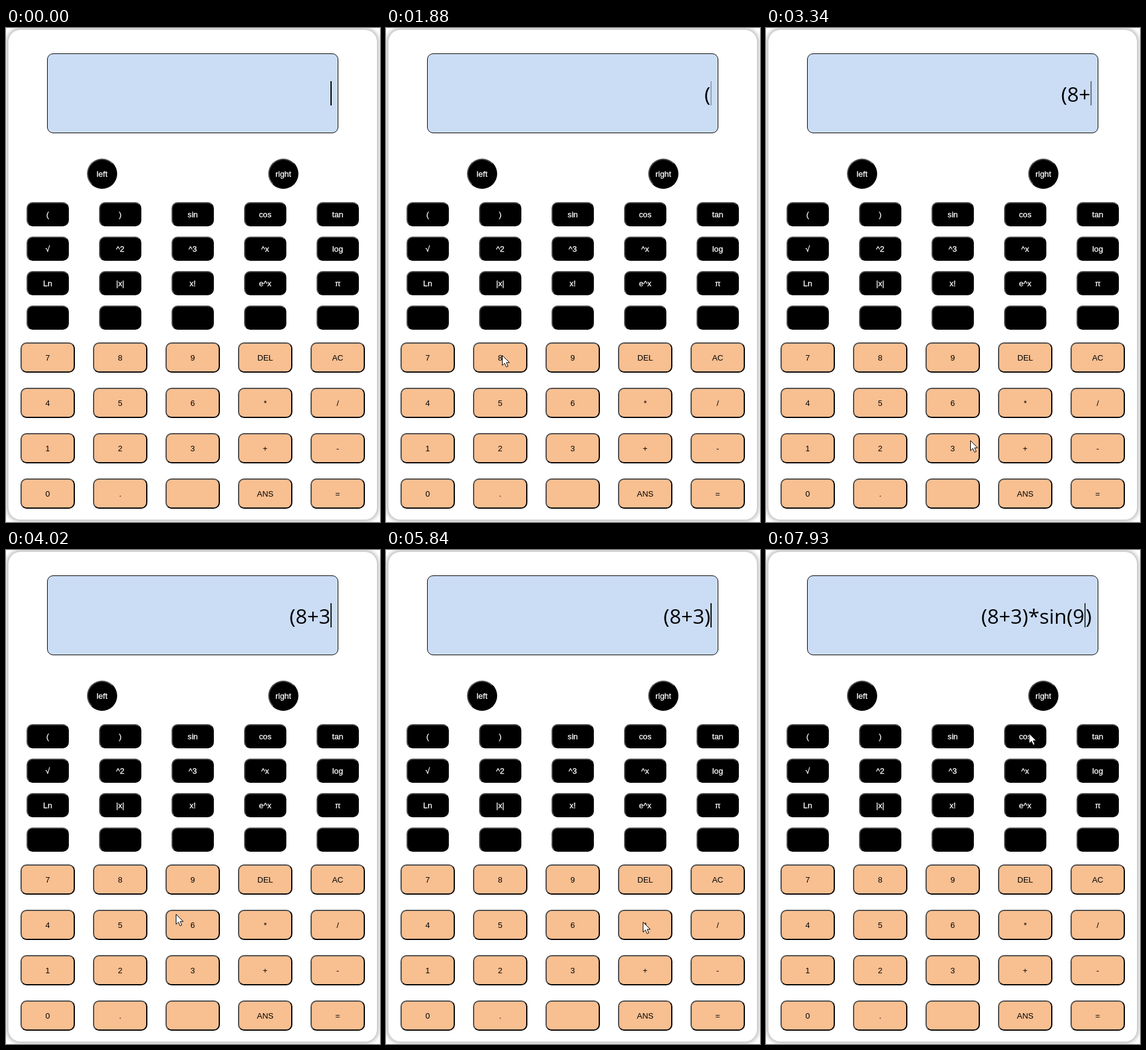
Animation of 619x817 px, one loop 8 s. Source, as an HTML page:

```html
<!DOCTYPE html>
<html lang="en">
<head>
<meta charset="utf-8">
<title>Calculator</title>
<style>
html, body { margin: 0; width: 100%; height: 100%; overflow: hidden; background: #fff; }
body { position: relative; }
body * { position: absolute; box-sizing: border-box; }
#card { left: 4px; top: 3px; width: 610px; height: 810px; border-radius: 20px; background: #fff; box-shadow: 0 0 6px 3px #bbb; }
#screen { left: 68px; top: 42px; width: 482px; height: 132px; border: 1px solid #000; border-radius: 10px; background: #cbddf5; }
#out { right: 10px; top: 46px; display: flex; font: 33.7px/40px "Open Sans", "Noto Sans", sans-serif; white-space: pre; color: #000; }
#out * { position: relative; }
#caret { top: -1px; width: 2px; height: 40px; background: #000; }
.key { display: flex; align-items: center; justify-content: center; border: 2px solid; border-color: #4c4c4c #000 #000 #4c4c4c; border-radius: 10px; font: 13.333px "Liberation Sans", Arial, sans-serif; }
.key.down { border-color: #000 #4c4c4c #4c4c4c #000; }
.dark { width: 70px; height: 40px; background: #000; color: #fff; -webkit-text-stroke: .3px #fff; }
.round { width: 50px; height: 50px; border-radius: 50%; }
.light { width: 90px; height: 50px; background: #f8bf91; color: #000; }
#mouse { left: 0; top: 0; width: 40px; height: 40px; overflow: visible; }
</style>
</head>
<body>
<div id="card"></div>
<div id="screen"><div id="out"><span id="head"></span><i id="caret"></i><span id="tail"></span></div></div>
<svg id="mouse">
  <path d="M.5 .5V17L4.4 13.4L7.2 19.6L9.9 18.4L7.2 12.3H12.3Z" fill="#fff" stroke="#000"/>
  <circle id="glow" cy="1" r="12" fill="#ff0" opacity=".5"/>
</svg>
<script>
const LOOP = 8000, PRESS = 100, TRAVEL = 500;
const $ = id => document.getElementById(id);
const mouse = $('mouse');
const keys = {};

function addKey(label, kind, x, y) {
  const el = document.createElement('div');
  el.className = 'key ' + kind;
  el.textContent = label;
  el.style.left = x + 'px';
  el.style.top = y + 'px';
  document.body.insertBefore(el, mouse);
  keys[label] = el;
}

function addGrid(rows, kind, x, y, rowStep) {
  rows.forEach((row, r) => row.split(' ').forEach((label, c) =>
    addKey(label, kind, x + c * 120, y + r * rowStep)));
}

addKey('left', 'dark round', 134, 216);
addKey('right', 'dark round', 434, 216);
addGrid(['( ) sin cos tan', '√ ^2 ^3 ^x log', 'Ln |x| x! e^x π', '    '], 'dark', 34, 288, 57);
addGrid(['7 8 9 DEL AC', '4 5 6 * /', '1 2 3 + -', '0 .  ANS ='], 'light', 24, 520, 75);

// The pointer rests at each key for PRESS ms; dx, dy are from the key's centre
const stop = (key, at, dx = 0, dy = 0, click = true) => {
  const el = keys[key];
  return {
    key, at, click, leave: at + PRESS,
    x: el.offsetLeft + el.offsetWidth / 2 + dx,
    y: el.offsetTop + el.offsetHeight / 2 + dy
  };
};
const hover = (key, at, dx, dy) => stop(key, at, dx, dy, false);

const stops = [
  hover('.', 170, 0, 20), hover('5', 600),
  stop('(', 1320, 5, 7), stop('8', 1920, 5), stop('+', 2880, 34, -17), stop('3', 3770, 0, -12),
  stop(')', 4590, -7, 5), hover('DEL', 5390, -6, 13), stop('*', 5860, -4, -5),
  hover('x!', 6200, -39, -19), stop('sin', 6670, 13, -5),
  hover('8', 7200, 21), stop('9', 7600, -4), hover('cos', 7930, 6, -5)
];

function pointer(t) {
  const i = Math.max(0, stops.findLastIndex(s => s.leave <= t));
  const a = stops[i], b = stops[i + 1] || a;
  const u = Math.min(1, Math.max(0, t - a.leave) / Math.min(TRAVEL, Math.max(1, b.at - a.leave)));
  const e = u * u * (3 - 2 * u);
  return [a.x + (b.x - a.x) * e, a.y + (b.y - a.y) * e].map(Math.round);
}

// Slow fade out, quicker fade in
function blink(age) {
  const a = Math.max(0, age) % 1045;
  return .5 + .5 * Math.cos(Math.PI * (a < 700 ? a / 700 : 1 + (a - 700) / 345));
}

function draw(t) {
  let head = '', tail = '', since = 170, pressed = null;
  for (const { key, at, leave, click } of stops) {
    if (!click || t < at) continue;
    if (t < leave) { pressed = key; continue; }
    head += key;
    since = leave;
    if (key === 'sin') { head += '('; tail = ')'; }
  }
  for (const key in keys) keys[key].classList.toggle('down', key === pressed);
  $('head').textContent = head;
  $('tail').textContent = tail;
  $('caret').style.opacity = blink(t - since);
  $('glow').style.display = pressed ? '' : 'none';
  const [x, y] = pointer(t);
  mouse.style.display = t < stops[0].leave ? 'none' : '';
  mouse.style.transform = `translate(${x}px, ${y}px)`;
}

const start = performance.now();
function frame() {
  draw((performance.now() - start) % LOOP);
  requestAnimationFrame(frame);
}
frame();
</script>
</body>
</html>
```
